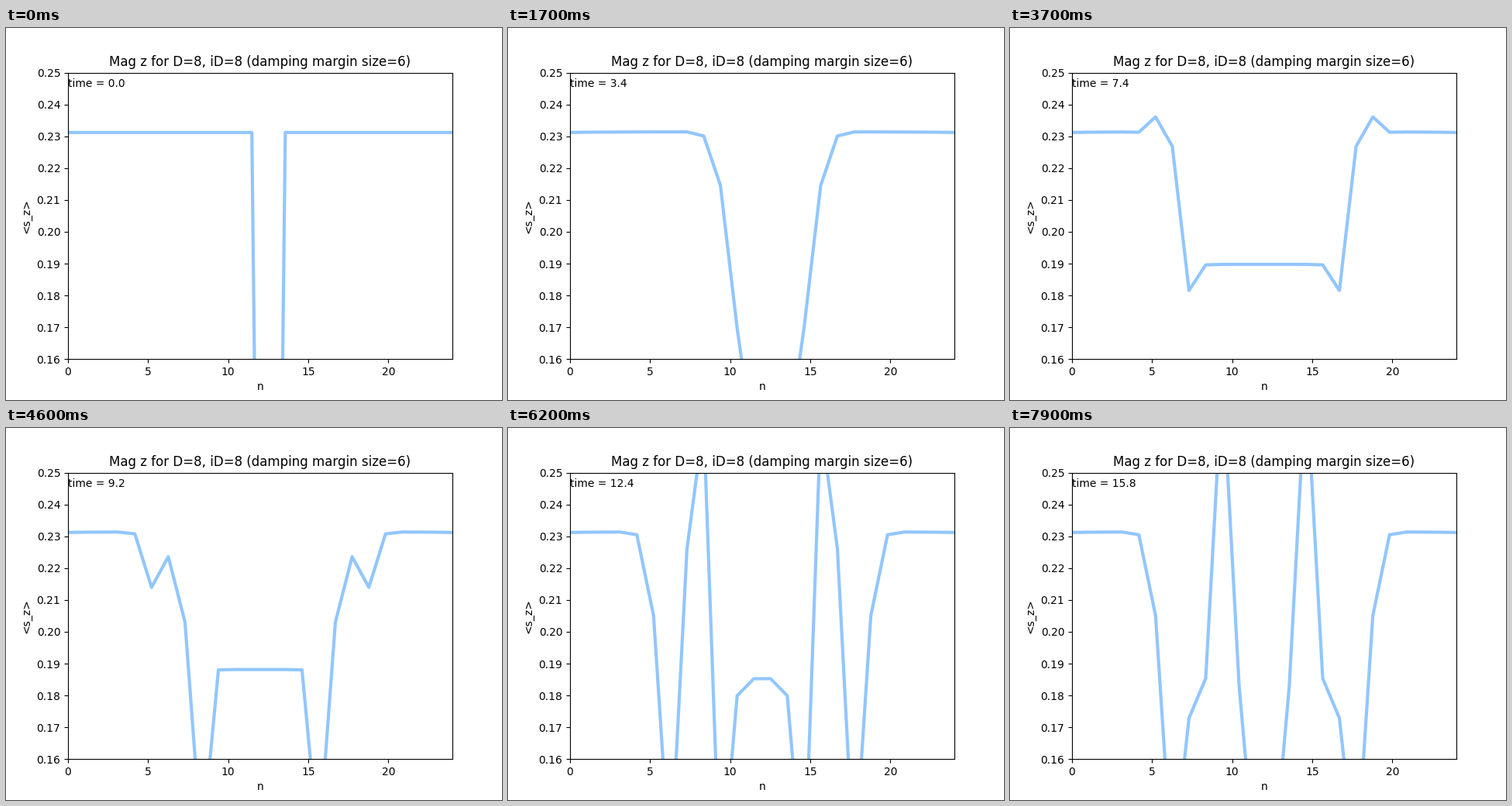
Animation, 640 px wide and 480 px high, one loop 8 s. Source, as a matplotlib script:

```python
import numpy as np
import matplotlib.pyplot as plt
from matplotlib.animation import FuncAnimation

SITES, FRAMES, DT = 24, 80, 0.2
CENTER, MARGIN = 12, 6
REST = 0.2312
site = np.arange(SITES)
depth = np.minimum(site, SITES - 1 - site)  # distance from the nearer end


def smooth(t, start, end):
    u = np.clip((t - start) / (end - start), 0, 1)
    return u * u * (3 - 2 * u)


def bell(s, mid, width, power=2):
    return np.exp(-(np.abs(s - mid) / width) ** power)


def rest_level(t):
    bump = np.sin(np.pi * site / (SITES - 1)) ** 0.5
    return REST + 0.00022 * min(t, 1) * bump


def spreading_dip(t):
    """One flipped spin spreads at constant speed; its total is conserved."""
    shape = bell(site, CENTER, 0.72 * t + 0.01, 1 + 0.6 * t)
    return 2 * REST * shape / shape.sum()


def trapped_dip(t, echo):
    """Flat core between the margins, with a trough growing at each margin."""
    core = (0.035 + 0.0009 * t) * (depth > MARGIN)
    return np.maximum(core, 0.111 * echo * bell(depth, MARGIN + 0.2, 1))


def reflected_pulse(t):
    """Crest and trough that run inwards from both margins."""
    s = depth - (7.72 + 0.43 * (t - 10.6))
    return 0.098 * bell(s, -0.9, 0.7, 3) - 0.09 * bell(s, 0.75, 0.45)


def magnetisation(t):
    arrival = smooth(t, 6, 7.4)
    echo = smooth(t, 6.6, 10.8)
    dip = (1 - arrival) * spreading_dip(t) + arrival * trapped_dip(t, echo)
    return rest_level(t) - dip + echo * reflected_pulse(t)


plt.rcParams["font.family"] = "DejaVu Sans"
fig, ax = plt.subplots(figsize=(6.4, 4.8), dpi=100)
ax.set(xlim=(0, 24), ylim=(0.16, 0.25), xlabel="n", ylabel="<s_z>",
       title="Mag z for D=8, iD=8 (damping margin size=6)")
x = np.linspace(0, 24, SITES)
line, = ax.plot(x, magnetisation(0), color="#92C6FF", lw=3)
clock = ax.text(0, 0.95, "time = 0.0", transform=ax.transAxes)


def update(frame):
    t = frame * DT
    line.set_ydata(magnetisation(t))
    clock.set_text(f"time = {t:.1f}")
    return line, clock


anim = FuncAnimation(fig, update, frames=FRAMES, interval=100,
                     repeat=True, repeat_delay=0)
plt.show()
```
